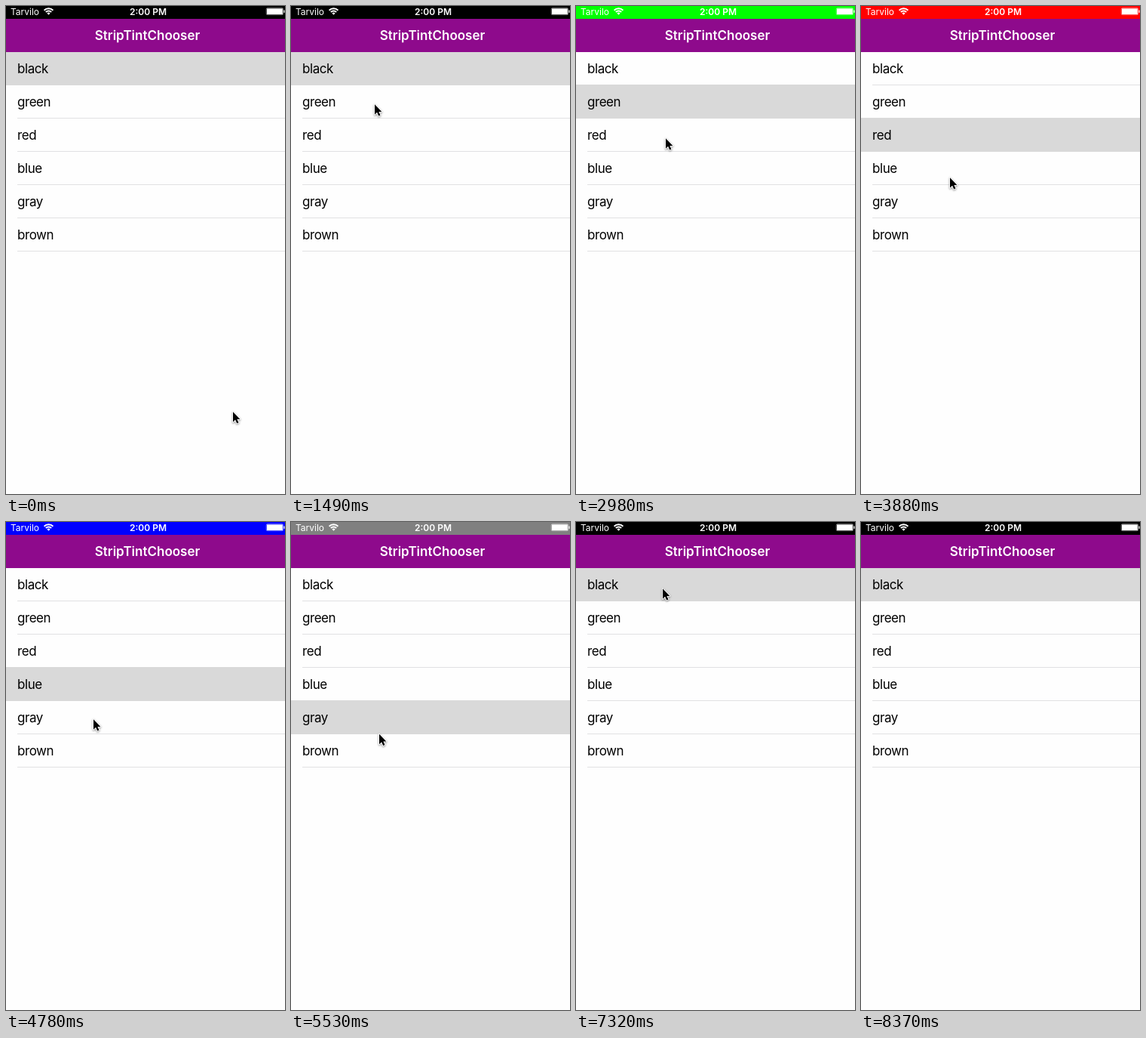
These frames come from a looping animation (370x646 px, 9.39 s). An HTML page with a canvas:

```html
<!DOCTYPE html>
<html lang="en">
<head>
<meta charset="utf-8">
<title>Status bar colours</title>
<style>
  html, body { margin: 0; width: 100%; height: 100%; overflow: hidden; background: #fefefe; }
  canvas { display: block; width: 370px; height: 646px; }
</style>
</head>
<body>
<canvas id="stage"></canvas>
<script>
const W = 370, H = 646, LOOP = 9390, TICK = 149;
const ROW_TOP = 61, ROW_H = 44;
const FONT = 'Inter, Roboto, sans-serif';

const rows = [
  ['black', '#000'], ['green', '#0f0'], ['red', '#f00'],
  ['blue', '#00f'], ['gray', '#808080'], ['brown', '#9b662c']
];

// [time, row]
const taps = [[0, 0], [1940, 1], [3280, 2], [4180, 3], [5080, 4], [6130, 5], [7320, 0]];
const tints = taps.map(([t, row]) => [row === 1 ? t + 150 : t, row]);

// Pointer moves: [start, steps, x, y]
const START = [300, 536], HIDE_AT = 8370;
const moves = [
  [150, 6, 56, 104], [1040, 2, 79, 120], [1340, 2, 110, 129],
  [2680, 3, 118, 174], [3580, 3, 117, 226], [4480, 3, 115, 260],
  [5530, 2, 117, 299], [6430, 3, 130, 170], [6877, 2, 114, 87],
  [7620, 5, 356, 617]
];

const canvas = document.getElementById('stage');
const ctx = canvas.getContext('2d');
const dpr = window.devicePixelRatio || 1;
canvas.width = W * dpr;
canvas.height = H * dpr;

const ease = p => (1 - Math.cos(Math.PI * p)) / 2;
const current = (list, t) => list.filter(e => e[0] <= t).pop()[1];

function pointerAt(t) {
  let [x, y] = START;
  for (const [start, steps, tx, ty] of moves) {
    if (t < start) break;
    const step = Math.min(steps, Math.floor((t - start) / TICK) + 1);
    const p = ease(step / steps);
    x += (tx - x) * p;
    y += (ty - y) * p;
  }
  return [x, y];
}

function box(color, x, y, w, h) {
  ctx.fillStyle = color;
  ctx.fillRect(x, y, w, h);
}

function text(str, x, y, size, weight, color, align = 'left', spacing = 0) {
  ctx.font = `${weight} ${size}px ${FONT}`;
  ctx.letterSpacing = spacing + 'px';
  ctx.textAlign = align;
  ctx.fillStyle = color;
  ctx.fillText(str, x, y);
}

function wifi(x, y) {
  const from = -Math.PI * 0.75, to = -Math.PI * 0.25;
  ctx.fillStyle = ctx.strokeStyle = '#fff';
  ctx.lineWidth = 1.9;
  ctx.beginPath();
  ctx.moveTo(x, y);
  ctx.arc(x, y, 2.9, from, to);
  ctx.fill();
  for (const r of [5.2, 8.4]) {
    ctx.beginPath();
    ctx.arc(x, y, r, from, to);
    ctx.stroke();
  }
}

function battery() {
  ctx.strokeStyle = 'rgba(255,255,255,.75)';
  ctx.lineWidth = 0.6;
  ctx.beginPath();
  ctx.roundRect(345.2, 2.7, 22.4, 9, 1.6);
  ctx.stroke();
  box('#fff', 346, 3.4, 20.8, 7.6);
  box('#fff', 368.3, 5.5, 1.2, 3.4);
}

function statusBar(color) {
  box(color, 0, 0, W, 17);
  text('Tarvilo', 6, 11.5, 12, 400, '#fff');
  wifi(56.5, 11.7);
  text('2:00 PM', 188.5, 11.5, 12, 600, '#fff', 'center');
  battery();
}

function table(selected) {
  rows.forEach(([name], i) => {
    const y = ROW_TOP + i * ROW_H;
    if (i === selected) {
      box('#d9d9d9', 0, i ? y - 1 : y, W, i ? ROW_H + 1 : ROW_H);
    } else if (i + 1 !== selected) {
      box('#e1e1e3', 15, y + ROW_H - 1, W - 15, 1);
    }
    text(name, 15, y + 28, 17, 400, '#000', 'left', -0.45);
  });
}

function pointer(x, y) {
  const arrow = new Path2D('M0 0V13.4L3.1 10.5 5.2 15.2 7.5 14.2 5.4 9.6H9.4Z');
  ctx.save();
  ctx.translate(x + 1, y + 1.3);
  ctx.lineJoin = 'round';
  ctx.strokeStyle = '#fff';
  ctx.lineWidth = 1.9;
  ctx.shadowColor = 'rgba(0,0,0,.45)';
  ctx.shadowBlur = 2.5 * dpr;
  ctx.shadowOffsetY = dpr;
  ctx.stroke(arrow);
  ctx.shadowColor = 'transparent';
  ctx.fillStyle = '#000';
  ctx.fill(arrow);
  ctx.restore();
}

function draw(t) {
  ctx.setTransform(dpr, 0, 0, dpr, 0, 0);
  box('#fefefe', 0, 0, W, H);
  table(current(taps, t));
  box('#8e0a8c', 0, 17, W, 44);
  text('StripTintChooser', 187.5, 45, 17, 600, '#fff', 'center');
  statusBar(rows[current(tints, t)][1]);
  if (t < HIDE_AT) pointer(...pointerAt(t));
}

const began = performance.now();
function frame() {
  draw((performance.now() - began) % LOOP);
  requestAnimationFrame(frame);
}
frame();
</script>
</body>
</html>
```
